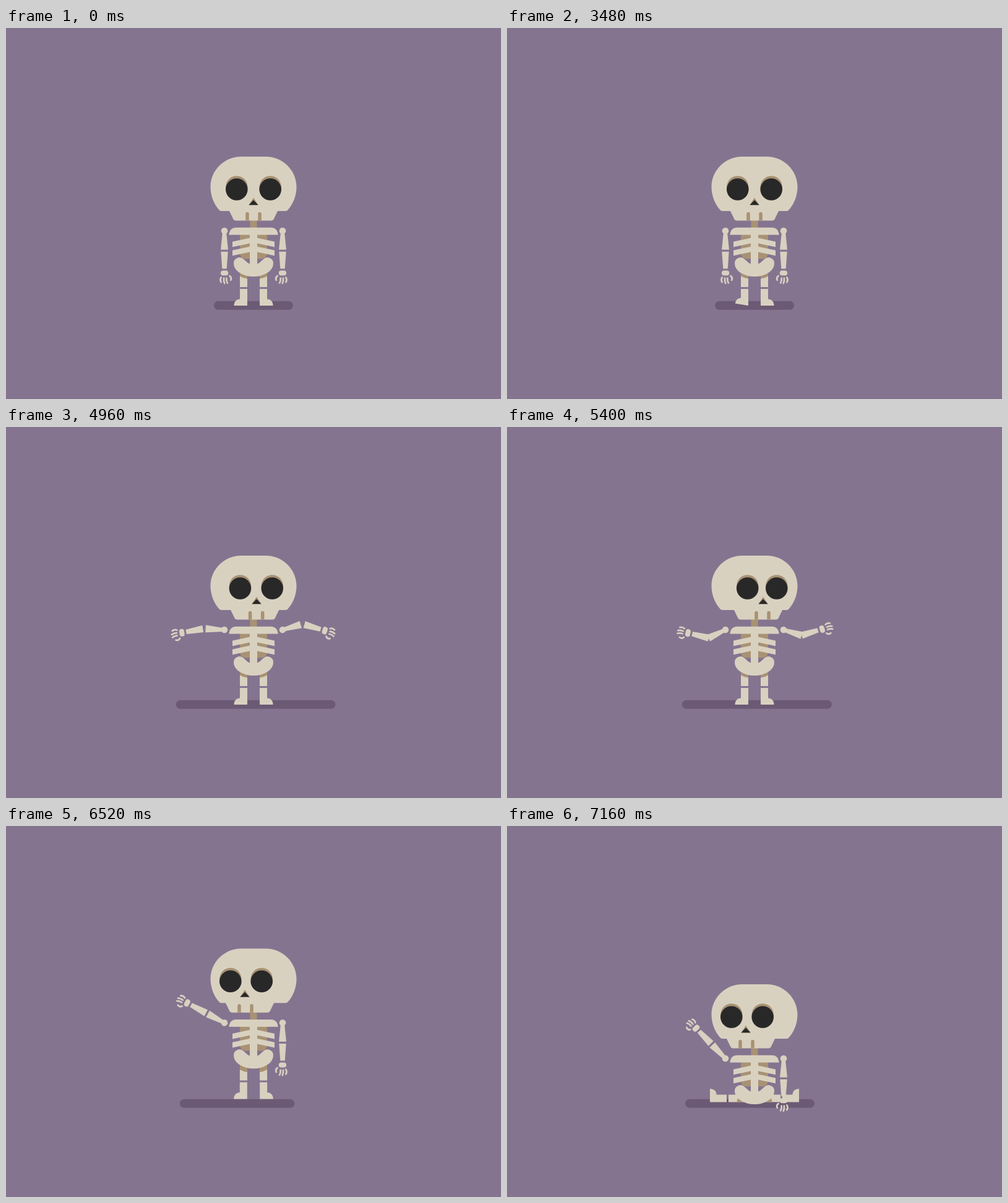
Animation of 800x600 px, one loop 9.64 s. Source, as an HTML page:

```html
<!DOCTYPE html>
<html lang="en">
<head>
<meta charset="utf-8">
<title>Dancing skeleton</title>
<style>
  html, body { margin: 0; width: 100%; height: 100%; overflow: hidden; background: #857490; }
  svg { display: block; width: 100%; height: 100%; }
  .bone { fill: #d9d1c0; }
  .shade { fill: #a89273; }
  .hole { fill: #282828; }
  .finger { fill: none; stroke: #d9d1c0; stroke-width: 2.7; stroke-linecap: round; }
</style>
</head>
<body>
<svg viewBox="0 0 800 600">
  <defs>
    <g id="thigh">
      <path class="bone" d="M378 393H390V419H378Z"/>
      <path class="shade" d="M378 393H390V405.5Q383 404.6 378 401.6Z"/>
      <path class="bone" d="M378 422H390V449L378 440Z"/>
    </g>
    <path id="foot" class="bone" d="M390 449H368.5C368.5 443 372 438.5 378 438.5L382 440Z"/>
    <g id="upper" class="bone">
      <circle cx="353" cy="328" r="5.3"/>
      <path d="M350 330H356L359 358.5H347Z"/>
    </g>
    <g id="fore">
      <path class="bone" d="M347.3 361.7H358.7L356.7 389.2H349.3Z"/>
      <rect class="bone" x="347" y="392.2" width="12.2" height="8" rx="3.8"/>
      <path class="finger" d="M347.7 403.4Q345.3 407 347.6 411M352.2 404.5Q351.3 409 353.2 412.8M356.4 404.5Q355.8 409 357.9 412.4M361.4 401Q365.2 403.4 363.2 407.8"/>
    </g>
    <g id="eye">
      <circle class="shade" cy="256.8" r="17.6"/>
      <circle class="hole" cy="261" r="17.8"/>
    </g>
  </defs>

  <rect id="shadow" y="441.8" height="14" rx="7" fill="#6c5a75"/>
  <g id="legL"><use href="#thigh"/><use id="tap" href="#foot"/></g>
  <g transform="matrix(-1 0 0 1 800 0)">
    <g id="legR"><use href="#thigh"/><use href="#foot"/></g>
  </g>

  <g id="body">
    <path class="shade" d="M394.5 305H405.5V325H394.5ZM378 330H422V363Q422 373.3 411 373.3H389Q378 373.3 378 363Z"/>
    <g class="bone">
      <path d="M360.3 334.6Q361.5 323 372 322.8H428Q438.5 323 439.7 334.6Z"/>
      <path d="M394 333H406V386H394Z"/>
      <path d="M366 345.4L400 338.2L434 345.4V354.2L400 347L366 354.2Z"/>
      <path d="M366 359.4L400 352.2L434 359.4V368.2L400 361L366 368.2Z"/>
      <path d="M368 381A9.5 9.5 0 0 1 384.2 373.9L390.5 379.8Q400 386 409.5 379.8L415.8 373.9A9.5 9.5 0 0 1 432 381A32 21 0 0 1 368 381Z"/>
    </g>
    <path id="jaw" class="bone" d="M360 294L367 308.6Q368.3 311.6 371.5 311.6H428.5Q431.7 311.6 433 308.6L440 294Z"/>
    <path class="bone" d="M380 208H420C447 208 469.5 230 469.5 257C469.5 271 464 285 455.5 294.3Q454.2 296 452 296H348Q345.8 296 344.5 294.3C336 285 330.5 271 330.5 257C330.5 230 353 208 380 208Z"/>
    <use id="eyeL" href="#eye"/>
    <use id="eyeR" href="#eye"/>
    <g id="nose">
      <path class="shade" d="M400 274.5L407.6 286.2H392.4Z"/>
      <path class="hole" d="M400 278.2L407.6 286.2H392.4Z"/>
    </g>
    <path id="teeth" class="shade" d="M387.2 311.6V300.5a2.75 2.75 0 0 1 5.5 0V311.6ZM407.3 311.6V300.5a2.75 2.75 0 0 1 5.5 0V311.6Z"/>
    <g id="armL"><use href="#upper"/><g id="foreL"><use href="#fore"/></g></g>
    <g transform="matrix(-1 0 0 1 800 0)">
      <g id="armR"><use href="#upper"/><g id="foreR"><use href="#fore"/></g></g>
    </g>
  </g>
</svg>
<script>
const LOOP = 9640, STEP = 40;

const smooth = p => (1 - Math.cos(Math.PI * p)) / 2;
const easeIn = p => p * p;
const easeOut = p => 1 - (1 - p) ** 2;

// Eased progress from 0 to 1 while t runs from start to end.
const ramp = (t, start, end, ease = smooth) =>
  ease(Math.min(1, Math.max(0, (t - start) / (end - start))));

const $ = id => document.getElementById(id);
const place = (id, transform) => $(id).setAttribute('transform', transform);
const slide = (id, x, y = 0) => place(id, `translate(${x} ${y})`);

// Six quick toe taps, 600 ms apart.
function tapAngle(t) {
  const u = (t + 400) % 600;
  if (t < 200 || t >= 3600 || u >= 400) return 0;
  return 10 * (1 - Math.abs(u / 200 - 1) ** 3);
}

function turnHead(h) {
  slide('eyeL', 372.8 + h * (h < 0 ? 10 : 15.9));
  slide('eyeR', 427.2 + h * (h < 0 ? 14 : 8.6));
  slide('nose', 14 * h);
  slide('teeth', 13 * h);
  slide('jaw', 6 * h);
}

// Swings an arm away from the body; bend splits upper arm and forearm.
function swingArm(side, angle, bend) {
  place('arm' + side, `rotate(${angle + bend} 353 328)`);
  place('fore' + side, `rotate(${-2 * bend} 358 360)`);
}

function pose(t) {
  const point = ramp(t, 3800, 4080);
  const wave = Math.max(0, 1 - Math.abs(t - 5400) / 1000); // there and back
  const ripple = Math.sin(1.6 * Math.PI * wave);
  const lift = ramp(wave, 0.04, 0.3);
  const greet = ramp(t, 6360, 6640);

  turnHead(2 * ramp(wave, 0.24, 0.76) - point);
  swingArm('L', 90 * point - 6 * wave + 46 * greet, 21 * ripple);
  swingArm('R', 90 * lift, -17 * lift * Math.cos(2.5 * Math.PI * (wave - 0.2)));
  place('tap', `rotate(${tapAngle(t)} 390 449)`);

  // Crouch, leap, drop and settle; the legs come off and follow.
  slide('body', 0, 8 * ramp(t, 6360, 6500) - 123 * ramp(t, 6500, 6767, easeOut)
    + 167 * ramp(t, 6767, 7060, easeIn) - 4 * ramp(t, 7060, 7160));
  const legY = 98.5 * ramp(t, 6760, 7060, easeIn) - 51 * ramp(t, 6500, 6760, easeOut);
  const legTurn = 90 * ramp(t, 6500, 7060);
  for (const side of 'LR') {
    place('leg' + side, `translate(0 ${legY}) rotate(${legTurn} 384 393)`);
  }

  const leap = ramp(t, 6400, 6800), land = ramp(t, 6800, 7120);
  const left = 336 - 62 * point - 5 * ripple + 4 * wave + 32 * leap - 18 * land;
  const right = 464 + lift * (78 - 17 * wave) + 12 * leap + 21 * land;
  $('shadow').setAttribute('x', left);
  $('shadow').setAttribute('width', right - left);
}

const start = performance.now();
function frame() {
  const t = (performance.now() - start) % LOOP;
  pose(Math.floor(t / STEP) * STEP);
  requestAnimationFrame(frame);
}
frame();
</script>
</body>
</html>
```
